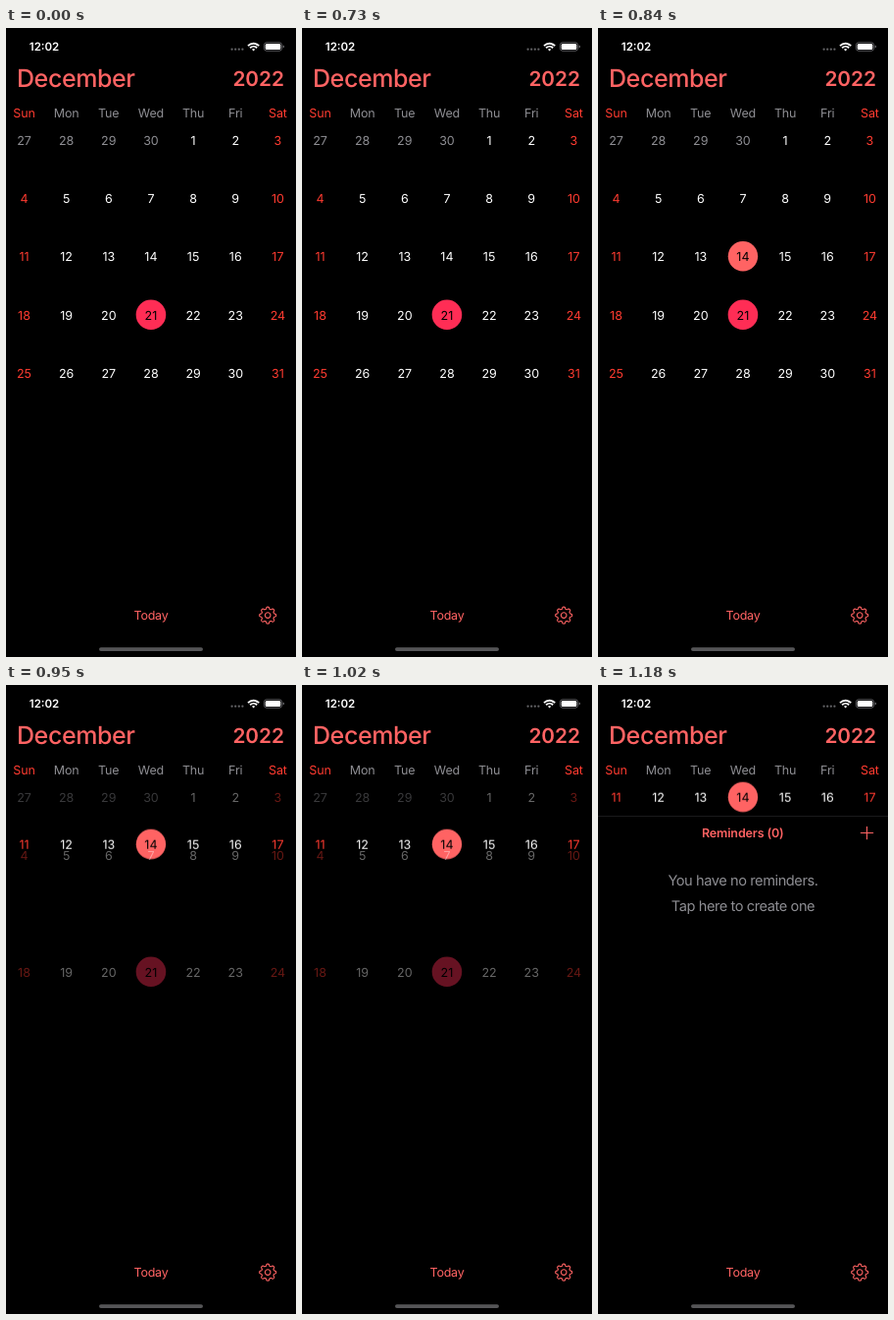
An HTML page for the animation above (1.21 s loop, 296x640 px).

```html
<!DOCTYPE html>
<html lang="en">
<head>
<meta charset="utf-8">
<title>Calendar</title>
<style>
  html, body { margin: 0; width: 100%; height: 100%; overflow: hidden; background: #000; }
  svg { display: block; width: 100%; height: 100%; }
  text { font: 400 12.5px Inter, Roboto, sans-serif; fill: #fff; text-rendering: geometricPrecision; }
  .mid text, text.mid { text-anchor: middle; }
  .gray text, text.gray { fill: #8e8e93; }
  text.red { fill: #ff3b30; }
  text.tint { fill: #ff6363; }
  text.black { fill: #000; }
  .month { font-size: 25px; font-weight: 500; letter-spacing: -.42px; }
  .year { font-size: 20.8px; font-weight: 600; text-anchor: end; }
  .clock { font-size: 11.5px; font-weight: 600; }
  .names text { letter-spacing: -.15px; }
  .today { letter-spacing: -.25px; }
  .heading { font-weight: 600; letter-spacing: -.12px; }
  .hint { font-size: 14.6px; letter-spacing: -.42px; }
  .line { fill: none; stroke: #ff6363; stroke-width: 1.1; stroke-linecap: round; stroke-linejoin: round; }

  .fade, .last, .week, .pick, .picked, .panel { animation: 1210ms step-end infinite; }
  .fade { animation-name: fade; }
  .last { animation-name: vanish; }
  .week { animation-name: rise; }
  .pick { animation-name: pick; }
  .picked { animation-name: darken; }
  .panel { animation-name: reveal; }
  @keyframes fade {
    0% { opacity: 1; }
    78.512% { opacity: .4; }
    88.43%, 100% { opacity: 0; }
  }
  @keyframes vanish {
    0% { opacity: 1; }
    78.512%, 100% { opacity: 0; }
  }
  @keyframes rise {
    0% { transform: translateY(0); }
    78.512% { transform: translateY(-70.3px); }
    88.43%, 100% { transform: translateY(-118.3px); }
  }
  @keyframes pick {
    0% { opacity: 0; }
    69.421%, 100% { opacity: 1; }
  }
  @keyframes darken {
    0% { fill: #fff; }
    69.421%, 100% { fill: #000; }
  }
  @keyframes reveal {
    0% { opacity: 0; }
    97.521%, 100% { opacity: 1; }
  }
</style>
</head>
<body>
<svg viewBox="0 0 296 640">
  <text class="clock" x="23.8" y="23">12:02</text>
  <g fill="#636366">
    <circle cx="230.6" cy="21.7" r="1.15"/>
    <circle cx="234.2" cy="21.7" r="1.15"/>
    <circle cx="237.8" cy="21.7" r="1.15"/>
    <circle cx="241.4" cy="21.7" r="1.15"/>
  </g>
  <g fill="none" stroke="#fff" stroke-width="1.9">
    <path d="M247 18.1a8 8 0 0 1 11.2 0"/>
    <path d="M249.1 20.3a5 5 0 0 1 7 0"/>
    <path d="M252.6 23.4l-1.6-1.7a2.3 2.3 0 0 1 3.2 0z" fill="#fff" stroke="none"/>
  </g>
  <rect x="263.4" y="14.8" width="18.2" height="8.4" rx="2.6" fill="none" stroke="#77777b" stroke-width=".8"/>
  <rect x="264.7" y="16.1" width="15.6" height="5.8" rx="1.5" fill="#fff"/>
  <path d="M282.7 17.6q1.3 .4 1.3 1.4t-1.3 1.4z" fill="#77777b"/>

  <text class="month tint" x="11" y="60">December</text>
  <text class="year tint" x="284" y="58.8">2022</text>
  <g id="names" class="mid names gray"></g>
  <g id="days" class="mid"></g>

  <g class="panel">
    <path d="M0 133.5H296" stroke="#1a1a1c"/>
    <text class="mid heading tint" x="147.8" y="154.8">Reminders (0)</text>
    <path class="line" d="M268.3 150.5h12.4M274.5 144.3v12.4"/>
    <text class="mid hint gray" x="148" y="204.2">You have no reminders.</text>
    <text class="mid hint gray" x="148" y="230">Tap here to create one</text>
  </g>

  <text class="mid today tint" x="148" y="602.3">Today</text>
  <g class="line" transform="translate(267.2 597.6)">
    <path id="gear"/>
    <circle r="2.8"/>
  </g>
  <rect x="95" y="630.2" width="106" height="3.8" rx="1.9" fill="#555557"/>
</svg>
<script>
  const NS = 'http://www.w3.org/2000/svg';
  const byId = id => document.getElementById(id);
  const columnX = col => 18.5 + 43.15 * col;
  const rowY = row => 114.4 + 59.2 * row;

  function add(parent, tag, attrs, content = '') {
    const node = document.createElementNS(NS, tag);
    for (const name in attrs) node.setAttribute(name, attrs[name]);
    node.textContent = content;
    return parent.appendChild(node);
  }

  const weekend = col => col % 6 === 0;

  ['Sun', 'Mon', 'Tue', 'Wed', 'Thu', 'Fri', 'Sat'].forEach((name, col) =>
    add(byId('names'), 'text', { x: columnX(col), y: 91, class: weekend(col) ? 'red' : '' }, name));

  function dayClass(day, col) {
    if (day < 1) return 'gray';
    if (day === 14) return 'picked';
    if (day === 21) return 'black';
    return weekend(col) ? 'red' : '';
  }

  // The chosen week comes first so that fading days overlap it.
  const rowClass = ['fade', 'fade', 'week', 'fade', 'last'];
  for (const row of [2, 0, 1, 3, 4]) {
    const group = add(byId('days'), 'g', { class: rowClass[row] });
    const y = rowY(row);
    for (let col = 0; col < 7; col++) {
      const day = row * 7 + col - 3;
      const x = columnX(col);
      if (day === 14) add(group, 'circle', { cx: x, cy: y - .5, r: 15.2, fill: '#ff6363', class: 'pick' });
      if (day === 21) add(group, 'circle', { cx: x, cy: y - .3, r: 15.3, fill: '#ff2d55' });
      add(group, 'text', { x, y: y + 4.6, class: dayClass(day, col) }, day < 1 ? day + 30 : day);
    }
  }

  const gearPoints = Array.from({ length: 128 }, (_, i) => {
    const angle = i * Math.PI / 64;
    const radius = 7.5 + Math.tanh(2.2 * Math.cos(8 * angle));
    return [radius * Math.sin(angle), -radius * Math.cos(angle)].map(v => v.toFixed(2));
  });
  byId('gear').setAttribute('d', `M${gearPoints.join('L')}Z`);
</script>
</body>
</html>
```
